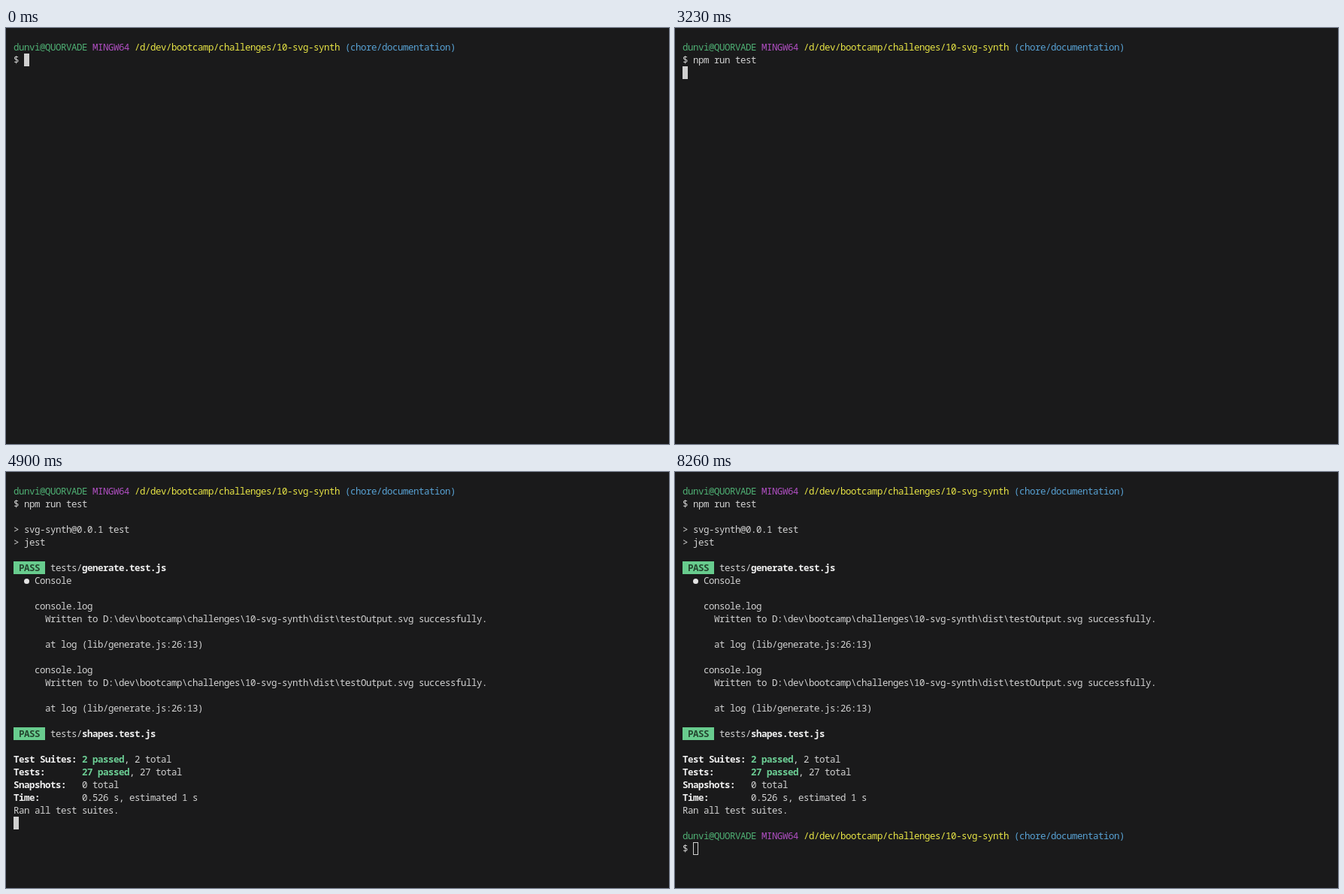
Write an HTML page that moves like this. It is 882x554 px and loops after 8360 ms.

```html
<!DOCTYPE html>
<html lang="en">
<head>
<meta charset="utf-8">
<title>Terminal test run</title>
<style>
  html, body { margin: 0; width: 100%; height: 100%; overflow: hidden; background: #1a1a1b; }
  #term { position: absolute; left: 10px; top: 17px; }
  #term span {
    position: absolute;
    height: 17px;
    white-space: pre;
    font: 12.5px/17px "Noto Sans Mono", "DejaVu Sans Mono", monospace;
    letter-spacing: calc(7px - 1ch);
    color: #d2d2d2;
  }
  #term .user { color: #4fb074; }
  #term .system { color: #b04fc2; }
  #term .path { color: #e8e545; }
  #term .branch { color: #58a2d4; }
  #term .bold { color: #f0f0f0; font-weight: 700; }
  #term .ok { color: #6dd096; font-weight: 700; }
  #term .dim { color: #858585; font-weight: 700; }
  #term .pass, #term .runs { width: 42px; font-weight: 600; color: #24452f; background: #68cc8e; }
  #term .runs { color: #38381a; background: #e8e545; }
  #term .dot::before {
    content: ""; position: absolute; left: 0; top: 6px;
    width: 7px; height: 7px; border-radius: 50%; background: #e4e4e4;
  }
  #cursor {
    position: absolute; width: 7px; height: 17px;
    background: #d0d0d0; box-shadow: inset 0 0 0 1px #d0d0d0;
  }
</style>
</head>
<body>
<div id="term"><div id="cursor"></div></div>
<script>
const LOOP = 8360, CELL = 7, LINE = 17;
const term = document.getElementById('term');
const cursor = document.getElementById('cursor');

// Plays [time, style] steps as hard changes, forever.
function playSteps(el, steps) {
  const frames = steps.map(([time, style]) => ({ ...style, offset: time / LOOP, easing: 'step-end' }));
  frames.push({ ...steps[steps.length - 1][1], offset: 1 });
  el.animate(frames, { duration: LOOP, iterations: Infinity });
}

function put(row, col, text, kind = '', from = 0, to = LOOP) {
  const el = document.createElement('span');
  el.className = kind;
  el.textContent = text;
  el.style.left = col * CELL + 'px';
  el.style.top = row * LINE + 'px';
  term.insertBefore(el, cursor);
  if (from === 0 && to === LOOP) return;
  const steps = [[0, { visibility: 'hidden' }], [from, { visibility: 'visible' }]];
  if (to < LOOP) steps.push([to, { visibility: 'hidden' }]);
  playSteps(el, steps);
}

function prompt(row, from) {
  put(row, 0, 'dunvi@QUORVADE', 'user', from);
  put(row, 15, 'MINGW64', 'system', from);
  put(row, 23, '/d/dev/bootcamp/challenges/10-svg-synth', 'path', from);
  put(row, 63, '(chore/documentation)', 'branch', from);
  put(row + 1, 0, '$', '', from);
}

function suite(row, label, file, from, to) {
  put(row, 0, ` ${label} `, label.toLowerCase(), from, to);
  put(row, 7, 'tests/', '', from, to);
  put(row, 13, file, 'bold', from, to);
}

function consoleLog(row, from) {
  put(row, 4, 'console.log', '', from);
  put(row + 1, 6, String.raw`Written to D:\dev\bootcamp\challenges\10-svg-synth\dist\testOutput.svg successfully.`, '', from);
  put(row + 3, 6, 'at log (lib/generate.js:26:13)', '', from);
}

function summary(row, label, passed, rest, from) {
  put(row, 0, label, 'bold', from);
  put(row, 13, passed, 'ok', from);
  put(row, 13 + passed.length, rest, '', from);
}

const command = 'npm run test';
const keyTimes = [200, 360, 560, 800, 1000, 1100, 1160, 1360, 1530, 1660, 1900, 2200];
const START = 3700, SEARCH = 4330, RUN = 4400, PASS = 4760, LOG = 4830, DONE = 4860, END = 5100, BLUR = 8230;

prompt(0, 0);
[...command].forEach((key, i) => put(1, 2 + i, key, '', keyTimes[i]));

put(3, 0, '> svg-synth@0.0.1 test', '', START);
put(4, 0, '> jest', '', START);
put(6, 0, 'Determining test suites to run...', 'dim', SEARCH, RUN);
suite(7, 'RUNS', 'generate.test.js', RUN, PASS);

suite(6, 'PASS', 'generate.test.js', PASS);
put(7, 2, '', 'dot', LOG);
put(7, 4, 'Console', '', LOG);
consoleLog(9, LOG);
consoleLog(14, LOG);

suite(19, 'PASS', 'shapes.test.js', DONE);
summary(21, 'Test Suites:', '2 passed', ', 2 total', DONE);
summary(22, 'Tests:', '27 passed', ', 27 total', DONE);
summary(23, 'Snapshots:', '', '0 total', DONE);
summary(24, 'Time:', '', '0.526 s, estimated 1 s', DONE);
put(25, 0, 'Ran all test suites.', '', DONE);
prompt(27, END);

// Cursor stops: time, row, column.
const stops = [
  [0, 1, 2],
  ...keyTimes.map((time, i) => [time, 1, 3 + i]),
  [3230, 2, 0], [START, 6, 0], [SEARCH, 6, 33], [RUN, 8, 0],
  [PASS, 7, 0], [LOG, 19, 0], [DONE, 26, 0], [END, 28, 2]
];
playSteps(cursor, stops.map(([time, row, col]) =>
  [time, { left: col * CELL + 'px', top: row * LINE + 'px' }]));
playSteps(cursor, [[0, { backgroundColor: '#d0d0d0' }], [BLUR, { backgroundColor: 'transparent' }]]);
</script>
</body>
</html>
```
